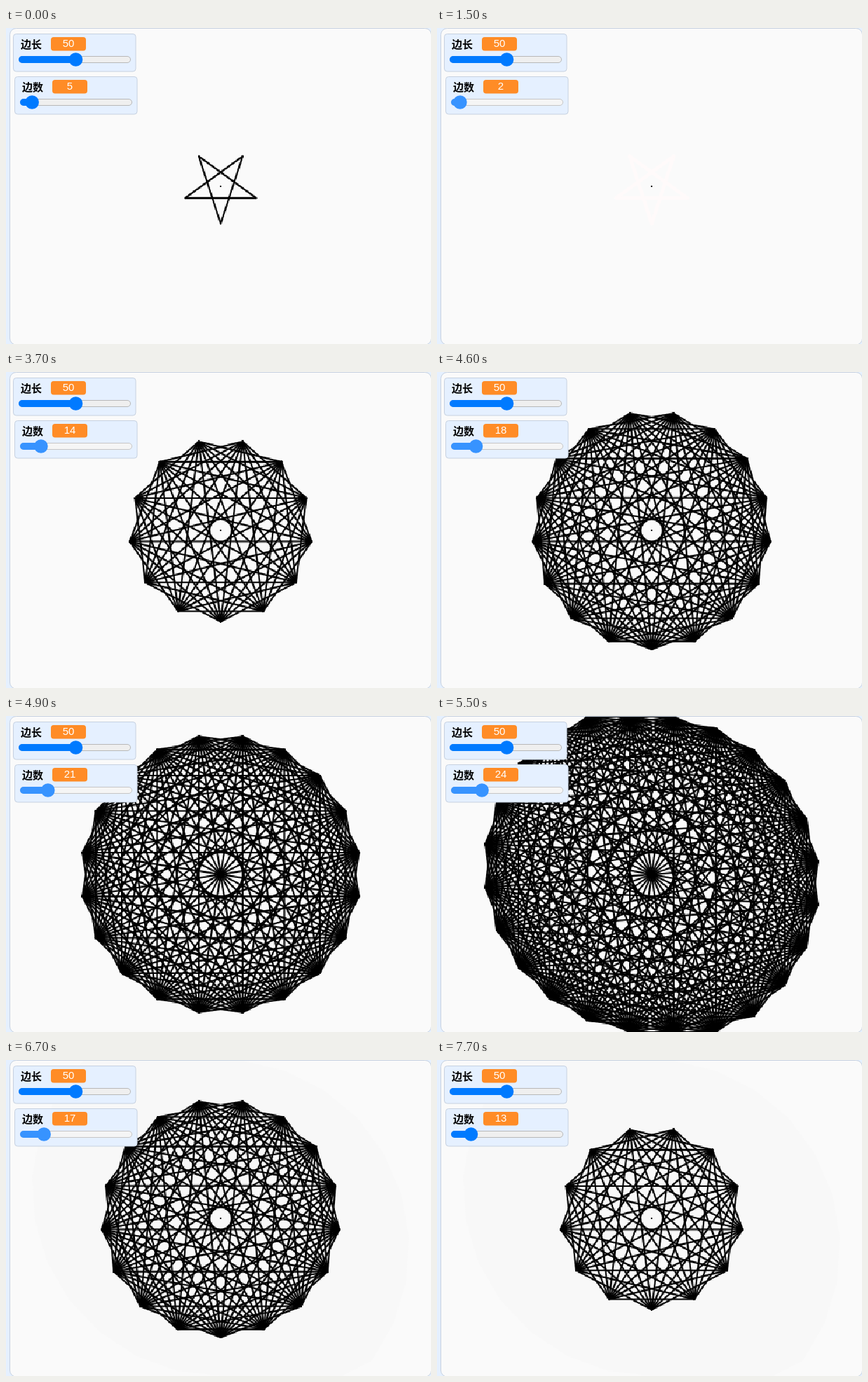
Animation, 606 px wide and 451 px high, one loop 8.6 s. Source, as an HTML page with a canvas:

```html
<!DOCTYPE html>
<html lang="zh">
<head>
<meta charset="utf-8">
<style>
  html, body { margin: 0; width: 100%; height: 100%; overflow: hidden; background: #e5f0ff; }
  canvas { display: block; }
</style>
</head>
<body>
<canvas id="stage" width="606" height="451"></canvas>
<script>
const ctx = document.getElementById('stage').getContext('2d');

// The pen draws on a low-resolution layer that is enlarged without smoothing.
const PEN_WIDTH = 480, PEN_HEIGHT = 360, SIDE = 50;
const layer = document.createElement('canvas');
layer.width = PEN_WIDTH;
layer.height = PEN_HEIGHT;
const pen = layer.getContext('2d');

const LOOP = 8600, TICK = 100;
const START_SIDES = 5, MOST_SIDES = 27;

// Slider drags: first and last tick, value reached, how far the number leads the drawing.
const drags = [
  [1200, 1400, 1], [1500, 1500, 2], [2000, 2000, 3], [2200, 2200, 5], [2700, 2700, 7],
  [3000, 3100, 10], [3300, 3400, 12], [3700, 3900, 15, 1], [4300, 4400, 17],
  [4600, 5100, 22, 1], [5400, 5700, 27], [6100, 6900, 15], [7200, 7300, 13],
];

const looks = {
  normal: { accent: '#007aff', track: '#efefef', edge: '#b8b8b8' },
  hover: { accent: '#005cc8', track: '#e5e5e5', edge: '#a8a8a8' },
  active: { accent: '#3793ff', track: '#f5f5f5', edge: '#c6c6c6' },
};

function sliderLook(t) {
  if (t >= 1200 && t < 7500) return looks.active;
  return t >= 600 && t < 7700 ? looks.hover : looks.normal;
}

function stateAt(t) {
  let sides = START_SIDES, value = START_SIDES;
  for (const [first, last, to, lead = 0] of drags) {
    if (t < first) break;
    const count = (last - first) / TICK + 1;
    const done = Math.min(count, Math.floor((t - first) / TICK) + 1);
    sides = Math.floor(sides + (to - sides) * done / count);
    value = done < count ? sides + lead : to;
  }
  return { sides, value };
}

const fence = y => Math.min(PEN_HEIGHT, Math.max(0, y));

// Walks clockwise around the polygon; the stage edge stops vertical movement.
function walk(n) {
  let x = (PEN_WIDTH - SIDE) / 2;
  let y = fence(PEN_HEIGHT / 2 - SIDE / 2 / Math.tan(Math.PI / n));
  const points = [];
  for (let i = 0; i < n; i++) {
    points.push([x, y]);
    const heading = 2 * Math.PI * i / n;
    x += SIDE * Math.cos(heading);
    y = fence(y + SIDE * Math.sin(heading));
  }
  return points;
}

function drawDiagonals(n, color, width) {
  const points = walk(n);
  pen.strokeStyle = color;
  pen.lineWidth = width;
  pen.lineCap = 'round';
  for (let i = 0; i < n; i++) {
    for (let j = i + 2; j < Math.min(n, n - 1 + i); j++) {
      pen.beginPath();
      pen.moveTo(...points[i]);
      pen.lineTo(...points[j]);
      pen.stroke();
    }
  }
}

function fillPolygon(n, color) {
  pen.beginPath();
  walk(n).forEach(point => pen.lineTo(...point));
  pen.fillStyle = color;
  pen.fill();
}

function box(x, y, w, h, r, fill, stroke) {
  ctx.beginPath();
  ctx.roundRect(x, y, w, h, r);
  ctx.fillStyle = fill;
  ctx.fill();
  if (!stroke) return;
  ctx.strokeStyle = stroke;
  ctx.lineWidth = 1;
  ctx.stroke();
}

function text(str, x, y, font, color, align) {
  ctx.font = font;
  ctx.fillStyle = color;
  ctx.textAlign = align;
  ctx.fillText(str, x, y);
}

function monitor(x, y, label, value, min, { accent, track, edge }) {
  const thumb = 18 + 140 * (value - min) / (100 - min);
  ctx.save();
  ctx.translate(x, y);
  box(0.5, 0.5, 174.5, 53.5, 4, '#e5f0ff', '#c6d1e0');
  text(label, 11, 20.5, 'bold 15px "Noto Sans CJK SC", "Noto Sans CJK", sans-serif', '#000', 'left');
  box(54, 5, 50, 19.5, 4, '#ff8c26');
  text(value, 79, 19, '15px "Liberation Sans", Arial, sans-serif', '#fff', 'center');
  box(8.5, 32.5, 159, 9, 4.5, track, edge);
  box(8, 32, thumb - 8, 10, 5, accent);
  ctx.beginPath();
  ctx.arc(thumb + 1.5, 37, 9.8, 0, 2 * Math.PI);
  ctx.fill();
  ctx.restore();
}

function render(t) {
  const { sides, value } = stateAt(t);

  pen.clearRect(0, 0, PEN_WIDTH, PEN_HEIGHT);
  // Faint traces left where a drawing was erased.
  if (t >= 6100) fillPolygon(MOST_SIDES, '#f8f8f8');
  if (sides < 4) drawDiagonals(START_SIDES, '#fffafa', 4);
  drawDiagonals(sides, '#000', 2);

  ctx.fillStyle = '#e5f0ff';
  ctx.fillRect(0, 0, 606, 451);
  box(5.5, 0.5, 601, 451.5, 9, '#fafafa', '#c6d1e0');
  ctx.save();
  ctx.beginPath();
  ctx.roundRect(6, 1, 600, 450, 9);
  ctx.clip();
  ctx.imageSmoothingEnabled = false;
  ctx.drawImage(layer, 6, 1, 600, 450);
  ctx.fillStyle = '#000';
  ctx.fillRect(305, 225, 2, 2);
  ctx.restore();

  monitor(10, 8, '边长', 50, 0, looks.normal);
  monitor(12, 69, '边数', value, 1, sliderLook(t));
}

const start = performance.now();
function tick() {
  render((performance.now() - start) % LOOP);
  requestAnimationFrame(tick);
}
tick();
</script>
</body>
</html>
```
